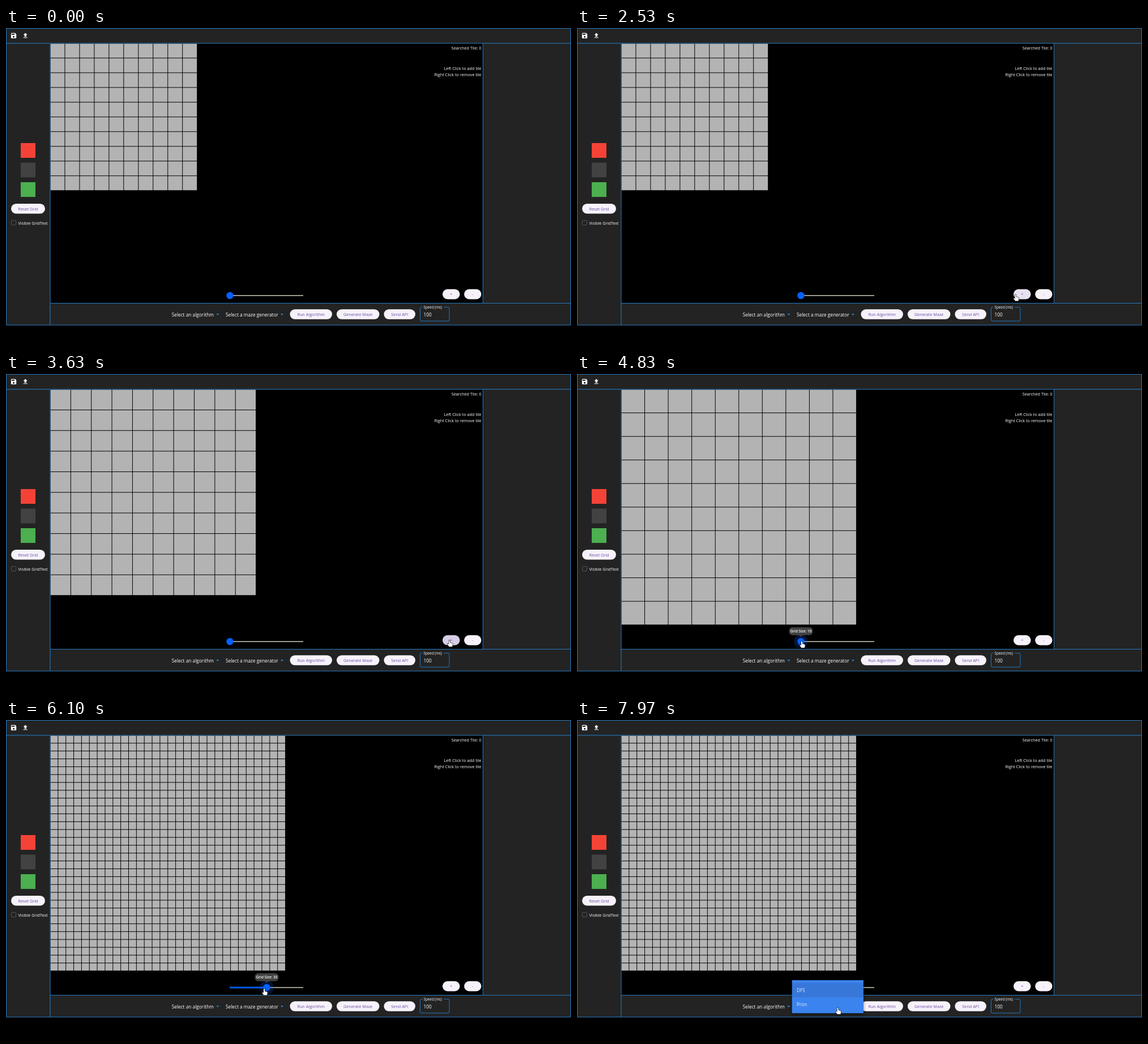
An HTML page with a canvas that plays this animation: 998 px wide and 561 px high, repeating every 8000 ms.

```html
<!DOCTYPE html>
<html lang="en">
<head>
<meta charset="utf-8">
<title>Path finding grid</title>
<style>
html, body { margin: 0; width: 100%; height: 100%; overflow: hidden; background: #000; }
canvas { display: block; width: 998px; height: 561px; }
</style>
</head>
<body>
<canvas id="stage"></canvas>
<script>
const W = 998, H = 561, LOOP = 8000;
const canvas = document.getElementById('stage');
const ratio = window.devicePixelRatio || 1;
canvas.width = W * ratio;
canvas.height = H * ratio;
const ctx = canvas.getContext('2d');

const PANEL = '#232323', LINE = '#2478bf', PURPLE = '#6750a4', BUTTON = '#f7f2fa';
const BLUE = '#0561ff', TRACK = '#9c998f', TILE = '#b3b3b3';

const saveIcon = new Path2D('M17 3H5a2 2 0 0 0-2 2v14a2 2 0 0 0 2 2h14a2 2 0 0 0 2-2V7zM12 19a3 3 0 1 1 0-6 3 3 0 0 1 0 6zM15 9H5V5h10z');
const uploadIcon = new Path2D('M5 20h14v-2H5zM5 10h4v6h6v-6h4l-7-7z');
const handIcon = new Path2D('M-1 .8Q0-.7 1 .8V4.6L4.8 5.5Q6 5.9 5.8 7.3L5 11.5H-.7L-3.5 7.6Q-3.5 6.1-2.2 6.6L-1 7.6Z');
const arrowIcon = new Path2D('M0 0V10L2.3 7.9L3.8 11.2L5.3 10.5L3.8 7.3H7Z');

const clamp = v => Math.min(1, Math.max(0, v));
const progress = (t, from, to) => clamp((t - from) / (to - from));
const smooth = v => v * v * (3 - 2 * v);

// Cursor tip positions: [time, x, y]
const cursorPath = [
  [2050, 690, 505], [2480, 774.5, 470], [2600, 775, 470], [2950, 783, 469.5],
  [4050, 783.5, 469.5], [4600, 397, 471.5], [5180, 397, 471.5], [6020, 456, 474],
  [6600, 457, 474], [7150, 462, 515], [7450, 461, 508], [8000, 460.5, 507.5]
];
const clicks = [3000, 3480, 3900];

function cursorAt(t) {
  if (t < cursorPath[0][0]) return null;
  const i = cursorPath.findIndex(p => p[0] > t);
  const [t0, x0, y0] = cursorPath[i - 1], [t1, x1, y1] = cursorPath[i];
  const k = smooth(progress(t, t0, t1));
  return { x: x0 + (x1 - x0) * k, y: y0 + (y1 - y0) * k };
}

function rect(x, y, w, h, fill) {
  ctx.fillStyle = fill;
  ctx.fillRect(x, y, w, h);
}

function round(x, y, w, h, r, fill) {
  ctx.beginPath();
  ctx.roundRect(x, y, w, h, r);
  ctx.fillStyle = fill;
  ctx.fill();
}

function disc(x, y, r, fill) {
  ctx.beginPath();
  ctx.arc(x, y, r, 0, 7);
  ctx.fillStyle = fill;
  ctx.fill();
}

function outline(x, y, w, h, color, r = 0) {
  ctx.beginPath();
  ctx.roundRect(x, y, w, h, r);
  ctx.strokeStyle = color;
  ctx.lineWidth = 1;
  ctx.stroke();
}

function text(s, x, y, size = 7.27, align = 'left', color = '#fff', weight = 500) {
  ctx.font = `${weight} ${size}px "Open Sans", "Noto Sans", sans-serif`;
  ctx.textAlign = align;
  ctx.fillStyle = color;
  ctx.fillText(s, x, y);
}

function button(label, x, y, w, fill = BUTTON) {
  round(x, y, w, 17.6, 8.8, fill);
  text(label, x + w / 2, y + 11.6, 7.27, 'center', PURPLE);
}

function icon(path, x, y, scale) {
  ctx.save();
  ctx.translate(x, y);
  ctx.scale(scale, scale);
  ctx.fillStyle = '#fff';
  ctx.fill(path, 'evenodd');
  ctx.restore();
}

function triangle(x, y, halfWidth, height, fill) {
  ctx.beginPath();
  ctx.moveTo(x - halfWidth, y);
  ctx.lineTo(x + halfWidth, y);
  ctx.lineTo(x, y + height);
  ctx.fillStyle = fill;
  ctx.fill();
}

function panel(x, y, w, h) {
  rect(x, y, w, h, PANEL);
  outline(x + .5, y + .5, w - 1, h - 1, LINE);
}

function drawGrid(count, size) {
  const step = size / count;
  for (let row = 0; row < count; row++)
    for (let col = 0; col < count; col++)
      rect(78 + col * step + .5, 27 + row * step + .5, step - 1, step - 1, TILE);
}

function drawPanels() {
  panel(0, 0, W, 27.5);
  panel(0, 26.5, 78.5, 498);
  panel(842, 26.5, 156, 459.5);
  panel(77.5, 485, 920.5, 39.5);
  icon(saveIcon, 7.3, 7.3, .52);
  icon(uploadIcon, 28, 7.1, .52);

  rect(26, 203, 26, 26, '#f44336');
  rect(26, 237.5, 26, 26, '#424242');
  rect(26, 272, 26, 26, '#4caf50');
  button('Reset Grid', 9, 310, 60);
  outline(9.5, 339.5, 8, 8, '#555', 1);
  text('Visible GridText', 21.5, 346.8);

  text('Searched Tile: 0', 839.7, 38, 7.27, 'right');
  text('Left Click to add tile', 839.7, 74.3, 7.27, 'right');
  text('Right Click to remove tile', 839.7, 84.8, 7.27, 'right');

  text('Select an algorithm', 292.7, 508.5, 8.3);
  triangle(374, 504.2, 2.6, 2.6, '#2196f3');
  text('Select a maze generator', 388, 508.5, 8.3);
  triangle(487.5, 504.2, 2.6, 2.6, '#2196f3');
  button('Run Algorithm', 501.5, 496.2, 74.5);
  button('Generate Maze', 584, 496.2, 75.5);
  button('Send API', 667.5, 496.2, 55.5);

  outline(731.5, 492.5, 51.5, 24.5, LINE, 2);
  rect(735.5, 491, 38, 3, PANEL);
  text('Speed (ms)', 737.5, 495.2, 6.3);
  text('100', 737.5, 508.6, 8.3);
}

function drawSlider(t, value) {
  const x = 395.5 + (value - 10) / 40 * 130, y = 472;
  const hover = progress(t, 4500, 4600) * (1 - progress(t, 6650, 6760));
  const tip = progress(t, 4560, 4660) * (1 - progress(t, 6650, 6760));
  rect(395, y - 1, 130, 2, TRACK);
  rect(395, y - 1.4, x - 395, 2.8, BLUE);
  disc(x, y, 12.4 * hover, 'rgba(5, 97, 255, .22)');
  disc(x, y, 6.2, BLUE);
  if (!tip) return;
  ctx.globalAlpha = tip;
  triangle(x, 460.5, 3.5, 3, '#424242');
  round(x - 21, 446.8, 42, 14, 6, '#424242');
  text('Grid Size: ' + value, x, 456.2, 6.4, 'center', '#fff', 600);
  ctx.globalAlpha = 1;
}

function drawZoomButtons(t) {
  const hovered = t > 2400 && t < 4120;
  button('+', 771, 460.8, 30.6, hovered ? '#e7e0ef' : BUTTON);
  const last = clicks.filter(c => c <= t).pop();
  if (last && t < last + 380) {
    const k = (t - last) / 380;
    ctx.save();
    ctx.beginPath();
    ctx.roundRect(771, 460.8, 30.6, 17.6, 8.8);
    ctx.clip();
    disc(784, 470, 5 + 34 * k, `rgba(103, 80, 164, ${.16 * (1 - k * k)})`);
    ctx.restore();
  }
  button('-', 809.2, 460.8, 30.4);
}

function drawMenu(t) {
  const opening = progress(t, 7600, 7900);
  if (!opening) return;
  const grow = smooth(progress(opening, .25, .75));
  const top = 489 - 30 * grow, bottom = 514 + 3.3 * grow;
  ctx.save();
  ctx.globalAlpha = progress(opening, 0, .25);
  ctx.shadowColor = 'rgba(0, 0, 0, .5)';
  ctx.shadowBlur = 5 * ratio;
  ctx.shadowOffsetY = 2 * ratio;
  round(379.8, top, 126.2, bottom - top, 1, '#3b83ee');
  ctx.shadowColor = 'transparent';
  ctx.beginPath();
  ctx.rect(379.8, top, 126.2, bottom - top);
  ctx.clip();
  rect(379.8, 464, 126.2, 25, '#3677d8');
  ctx.globalAlpha *= progress(opening, .4, .8);
  text('DFS', 388, 479.6, 8.3, 'left', '#e6f0ff');
  text('Prim', 388, 504.6, 8.3, 'left', '#e6f0ff');
  ctx.restore();
}

function drawCursor(t) {
  const at = cursorAt(t);
  if (!at) return;
  const overPlus = at.x > 771 && at.y < 480;
  const overSlider = at.x < 530 && at.y < 482;
  const overMenu = at.x < 500 && at.y > 492;
  const shape = overPlus || overSlider || overMenu ? handIcon : arrowIcon;
  ctx.save();
  ctx.translate(at.x, at.y);
  ctx.lineJoin = 'round';
  ctx.lineWidth = 1.2;
  ctx.strokeStyle = '#000';
  ctx.stroke(shape);
  ctx.fillStyle = '#fff';
  ctx.fill(shape);
  ctx.restore();
}

function render(t) {
  ctx.setTransform(ratio, 0, 0, ratio, 0, 0);
  rect(0, 0, W, H, '#000');
  const zoom = clicks.filter(c => c <= t).length;
  const count = 10 + Math.round(20 * smooth(progress(t, 5180, 6020)));
  drawGrid(count, 259.7 + 51.95 * zoom);
  drawPanels();
  drawSlider(t, count);
  drawZoomButtons(t);
  drawMenu(t);
  drawCursor(t);
}

const start = performance.now();
function frame() {
  render((performance.now() - start) % LOOP);
  requestAnimationFrame(frame);
}
frame();
</script>
</body>
</html>
```
